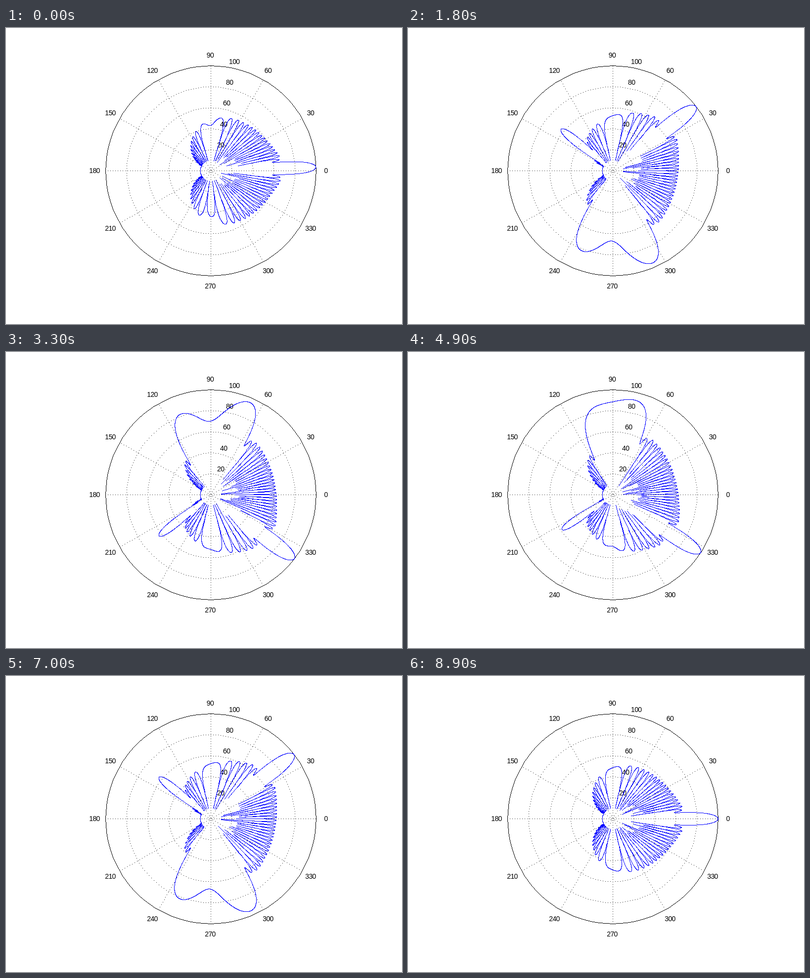
An HTML page with a canvas for the animation above (9 s loop, 801 px wide and 600 px high).

```html
<!DOCTYPE html>
<html lang="en">
<head>
<meta charset="utf-8">
<title>Array beam sweep</title>
<style>
  html, body { margin: 0; width: 100%; height: 100%; overflow: hidden; background: #fff; }
  svg, canvas { position: absolute; left: 0; top: 0; width: 801px; height: 600px; }
  text { font: 14px "Liberation Sans", Arial, sans-serif; letter-spacing: -0.6px; fill: #000; }
</style>
</head>
<body>
<svg id="labels" viewBox="0 0 801 600"></svg>
<canvas id="grid" width="801" height="600"></canvas>
<canvas id="beam" width="801" height="600"></canvas>
<script>
const CX = 414, CY = 289, R = 212.6;
const RAD = Math.PI / 180;
const STEPS = 90, STEP_MS = 100;

// Array: 30 elements, 0.65 wavelengths apart, raised-cosine taper.
const COUNT = 30, SPACING = 0.65, TAPER = 0.585;
const FLOOR = 10, SAMPLES = 10000, DOT_PITCH = 5;

const half = Array.from({ length: COUNT / 2 }, (_, i) => {
  const pos = i + 0.5;
  return {
    k: 2 * Math.PI * SPACING * pos,
    w: TAPER + (1 - TAPER) * Math.cos(2 * Math.PI * pos / (COUNT - 1))
  };
});

const angles = Array.from({ length: SAMPLES + 1 }, (_, i) => {
  const a = i / SAMPLES * 2 * Math.PI;
  return { sin: Math.sin(a), cos: Math.cos(a), gain: (1 + Math.cos(a)) ** 2 };
});

// Polar position (radius 0..100) to a whole pixel.
const toPixel = (r, cos, sin) => [
  Math.round(CX + R * r / 100 * cos),
  Math.round(CY - R * r / 100 * sin)
];

// Hard-edged polyline: one pixel in every `pitch` is painted.
function polyline(ctx, points, pitch = 1) {
  let n = 0;
  for (let i = 1; i < points.length; i++) {
    const [x0, y0] = points[i - 1], [x1, y1] = points[i];
    const len = Math.max(Math.abs(x1 - x0), Math.abs(y1 - y0));
    for (let s = 0; s < len; s++) {
      if (n++ % pitch) continue;
      const f = s / len;
      ctx.fillRect(Math.round(x0 + (x1 - x0) * f), Math.round(y0 + (y1 - y0) * f), 1, 1);
    }
  }
}

function drawGrid() {
  const ctx = document.getElementById("grid").getContext("2d");
  for (let r = 20; r <= 100; r += 20) {
    const ring = Array.from({ length: 101 }, (_, i) => {
      const a = i * Math.PI / 50;
      return toPixel(r, Math.cos(a), Math.sin(a));
    });
    polyline(ctx, ring, r < 100 ? DOT_PITCH : 1);
  }
  for (let d = 0; d < 180; d += 30) {
    const c = Math.cos(d * RAD), s = Math.sin(d * RAD);
    polyline(ctx, [toPixel(-100, c, s), toPixel(100, c, s)], DOT_PITCH);
  }
}

function addLabel(value, x, y, anchor) {
  const el = document.createElementNS("http://www.w3.org/2000/svg", "text");
  el.setAttribute("x", x);
  el.setAttribute("y", y);
  el.setAttribute("text-anchor", anchor);
  el.textContent = value;
  document.getElementById("labels").append(el);
}

function drawLabels() {
  for (let d = 0; d < 360; d += 30) {
    const x = 413.3 + 1.1 * R * Math.cos(d * RAD);
    const y = 294 - 1.1 * R * Math.sin(d * RAD);
    addLabel(d, Math.round(x), Math.round(y), "middle");
  }
  for (let r = 20; r <= 100; r += 20) {
    const d = (r + 1) / 100 * R;
    const x = 421 + d * Math.cos(82 * RAD);
    const y = 285.9 - d * Math.sin(82 * RAD);
    addLabel(r, Math.round(x), Math.round(y), "start");
  }
}

const beam = document.getElementById("beam").getContext("2d");
beam.fillStyle = "#00f";

function drawBeam(step) {
  const steer = Math.sin(2 * (step + 1) * RAD);
  const field = angles.map(a => {
    let sum = 0;
    for (const e of half) sum += e.w * Math.cos(e.k * (a.sin - steer));
    return Math.abs(sum) * a.gain;
  });
  const peak = field.reduce((m, v) => Math.max(m, v), 0);
  const points = angles.map((a, i) => {
    const r = Math.max(FLOOR, 100 + 20 * Math.log10(field[i] / peak));
    return toPixel(r, a.cos, a.sin);
  });
  beam.clearRect(0, 0, 801, 600);
  polyline(beam, points);
}

let shown = -1;
function tick() {
  const step = Math.floor(performance.now() / STEP_MS) % STEPS;
  if (step !== shown) drawBeam(shown = step);
  requestAnimationFrame(tick);
}

drawGrid();
drawLabels();
tick();
</script>
</body>
</html>
```
